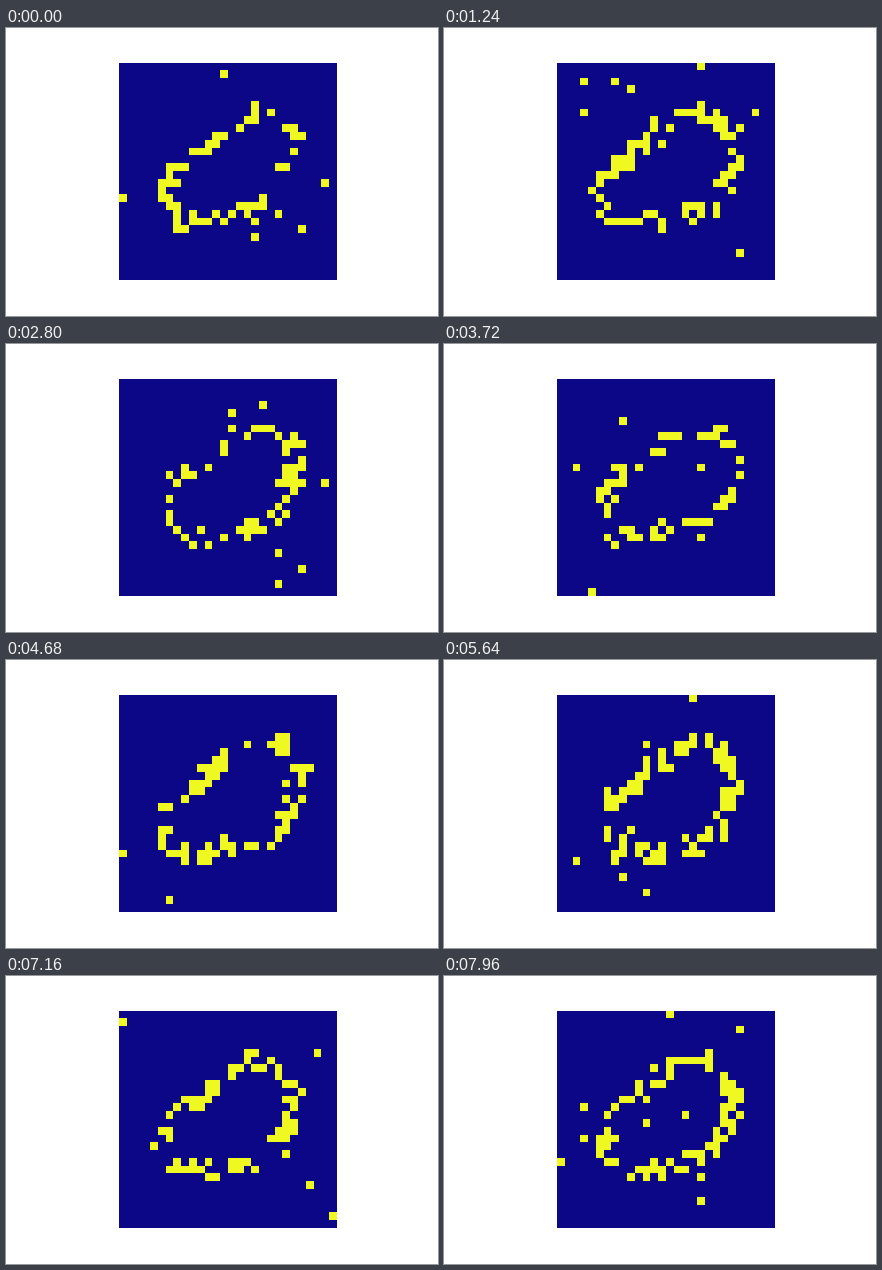
Animation of 432 by 288 pixels, one loop 8000 ms. Source, as a matplotlib script:

```python
import numpy as np
import matplotlib.pyplot as plt
from matplotlib.animation import FuncAnimation

SIZE = 28
FRAMES = 200
INTERVAL = 40
RING_RATE = 0.47
NOISE_RATE = 0.008


def outline(steps=240):
    """Slanted zero: an oval whose radius is bent by a few harmonics."""
    a = np.linspace(0, 2 * np.pi, steps, endpoint=False)
    radius = (7.1
              + 0.70 * np.cos(a - 0.7)
              + 1.95 * np.cos(2 * a + 1.2)
              + 0.55 * np.cos(3 * a - 2.2)
              + 0.33 * np.cos(4 * a + 2.6))
    return 14 + radius * np.cos(a), 13.3 + radius * np.sin(a)


def firing_rates():
    rows, cols = np.mgrid[:SIZE, :SIZE]
    x, y = outline()
    dist = np.hypot(cols[..., None] - x, rows[..., None] - y).min(axis=-1)
    return NOISE_RATE + RING_RATE * np.exp(-(dist / 1.3) ** 4)


RATES = firing_rates()


def spikes(frame):
    rng = np.random.default_rng(1000 + frame)
    return (rng.random(RATES.shape) < RATES).astype(float)


fig = plt.figure(figsize=(6, 4), dpi=72, facecolor="white")
ax = fig.add_axes([0.125, 0.125, 0.775, 0.755])
ax.axis("off")
image = ax.imshow(spikes(0), cmap="plasma", vmin=0, vmax=1,
                  interpolation="nearest")


def update(frame):
    image.set_data(spikes(frame))
    return (image,)


anim = FuncAnimation(fig, update, frames=FRAMES, interval=INTERVAL,
                     repeat=True, repeat_delay=0)
plt.show()
```
